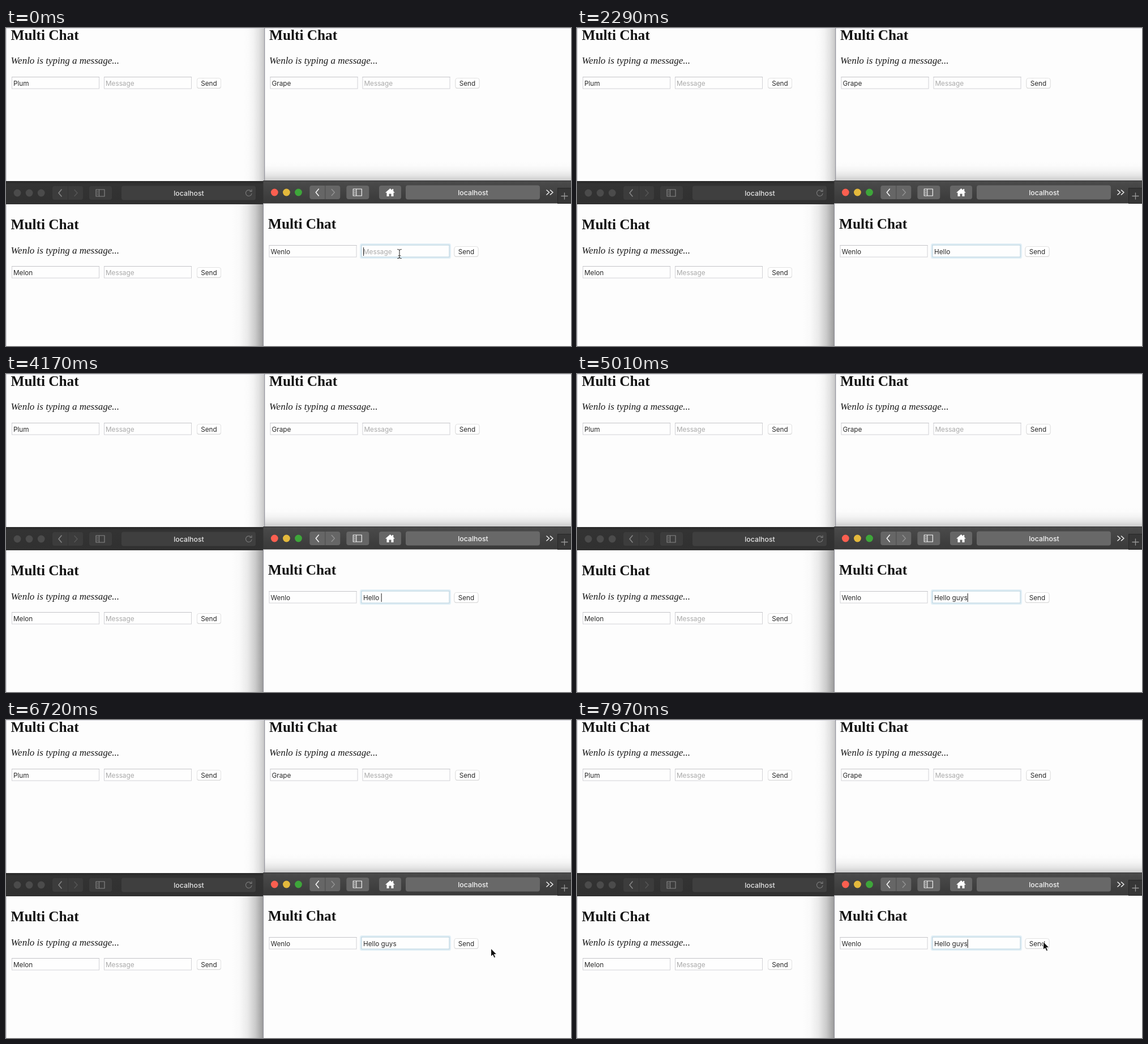
Animation of 998 by 561 pixels, one loop 8000 ms. Source, as an HTML page:

```html
<!DOCTYPE html>
<html lang="en">
<head>
<meta charset="utf-8">
<title>Multi Chat</title>
<style>
  html, body { margin: 0; width: 100%; height: 100%; overflow: hidden; background: #fdfdfd; }
  svg { display: block; width: 100vw; height: 100vh; }
  text { white-space: pre; fill: #2a2a2a; }
  .title { font: bold 25.3px "Liberation Serif", serif; fill: #111; }
  .typing { font: italic 17px "Liberation Serif", serif; fill: #1a1a1a; }
  .field { font: 11.75px Inter, sans-serif; }
  .hint { fill: #a9a9a9; }
  .address { font: 500 12.3px Inter, sans-serif; text-anchor: middle; }
  .button { text-anchor: middle; }
  .icon { fill: none; stroke-width: 1.6; stroke-linecap: round; stroke-linejoin: round; }
</style>
</head>
<body>
<svg id="stage" viewBox="0 0 998 561" preserveAspectRatio="none"></svg>
<script>
const LOOP = 8000, BLINK = 500;
const USER = 'Wenlo';

// Each step: time, contents of the message field
const typed = [
  [0, ''], [950, 'H'], [1220, 'He'], [1390, 'Hel'], [1540, 'Hell'], [1700, 'Hello'],
  [3950, 'Hello '], [4300, 'Hello g'], [4500, 'Hello gu'], [4700, 'Hello guy'], [4900, 'Hello guys']
];
// Pointer path: time, x, y
const path = [[6000, 695, 398], [6500, 845, 405], [6720, 856.5, 403], [7000, 852, 402], [7500, 823.5, 391]];

const box = (x, y, w, h, fill, extra = '') =>
  `<rect x="${x}" y="${y}" width="${w}" height="${h}" fill="${fill}" ${extra}/>`;
const label = (x, y, cls, text, extra = '') =>
  `<text x="${x}" y="${y}" class="${cls}" ${extra}>${text}</text>`;
const icon = (d, color, extra = '') => `<path class="icon" d="${d}" stroke="${color}" ${extra}/>`;

function input(x, y, text, cls = '') {
  return box(x + .5, y + .5, 154, 20.5, '#fefefe', 'stroke="#d2d2d6"')
    + `<path d="M${x} ${y + .5}h155" stroke="#c4c4c8"/>`
    + label(x + 3, y + 15.6, 'field ' + cls, text);
}

function page(dx, titleY, formY, name, active) {
  const message = active
    ? box(dx + 172, formY - 1.5, 158, 24, 'none', 'rx="2" stroke="#e2eff6" stroke-width="3"')
      + box(dx + 173.5, formY, 155, 21, '#fefefe', 'stroke="#b4cfdd"')
      + label(dx + 176.5, formY + 15.6, 'field', '', 'id="message"')
    : input(dx + 173, formY, 'Message', 'hint');
  return label(dx + 8.5, titleY, 'title', 'Multi Chat')
    + (active ? '' : label(dx + 8.5, titleY + 42.3, 'typing', USER + ' is typing a message...'))
    + input(dx + 10, formY, name) + message
    + box(dx + 337, formY + 3, 43, 18, '#d8d8d8', 'rx="4"')
    + box(dx + 337.5, formY + 2.5, 42, 17.5, '#fff', 'rx="3.5" stroke="#e2e2e2"')
    + label(dx + 358.5, formY + 15.6, 'field button', 'Send');
}

const light = (x, y, color) => `<circle cx="${x}" cy="${y}" r="6.4" fill="${color}"/>`;
const sidebar = (x, y, color) =>
  icon(`M${x - 7.5} ${y - 6}h15v12h-15zM${x - 2} ${y - 6}v12M${x - 5.5} ${y - 3}h1.5m-1.5 3h1.5m-1.5 3h1.5`, color, 'style="stroke-width:1.2"');

function toolbar(x, y, o) {
  const button = (bx, w) => box(x + bx, y - 12, w, 24, o.button, 'rx="4"');
  return o.lights.map((c, i) => light(x + 20 + i * 21.1, y, c)).join('')
    + button(82, 54)
    + icon(`M${x + 109.5} ${y - 12}v24`, o.split, 'style="stroke-width:1"')
    + icon(`M${x + 98} ${y - 6}l-5 6 5 6`, o.back)
    + icon(`M${x + 121} ${y - 5.5}l5 5.5-5 5.5`, o.forward)
    + button(147, 40) + sidebar(x + 166.5, y, o.back);
}

const url = (x, y, fill, color) => box(x, y - 12.5, 237, 25, fill, 'rx="4"')
  + label(x + 119, y + 5, 'address', 'localhost', `style="fill:${color}"`);

const gradient = (id, dir, stops) => `<linearGradient id="${id}" ${dir}>`
  + stops.map(([at, color, alpha = 1]) => `<stop offset="${at}" stop-color="${color}" stop-opacity="${alpha}"/>`).join('')
  + '</linearGradient>';
const down = 'x1="0" y1="0" x2="0" y2="1"';
const shadow = (id, dir, strength) =>
  gradient(id, dir, [0, .25, .5, .75, 1].map(at => [at, '#333', strength * at ** 2.4]));

stage.innerHTML = `<defs>
  ${shadow('side', '', .5)}
  ${shadow('sideSoft', '', .26)}
  ${shadow('under', down, .24)}
  ${gradient('dim', down, [[0, '#292929'], [.15, '#333'], [1, '#303030']])}
  ${gradient('bright', down, [[0, '#4b4b4b'], [1, '#393939']])}
  </defs>`
  + box(0, 0, 998, 561, '#fdfdfd')
  + box(418, 0, 38, 270, 'url(#sideSoft)')
  + box(457, 234, 541, 35, 'url(#under)')
  + box(398, 310, 57, 251, 'url(#side)')
  + box(0, 0, 998, 1, '#d6d6de') + box(0, 0, 1, 561, '#c9c9d2')
  + box(456, 0, 1.3, 269, '#96969e')
  + page(0, 20.8, 86, 'Plum') + page(456.5, 20.8, 86, 'Grape')
  + page(0, 355.3, 420, 'Melon') + page(454.5, 354.3, 383, USER, true)
  // Inactive window
  + box(0, 270, 455, 41, 'url(#dim)')
  + toolbar(0, 291, { lights: ['#4b4b4b', '#4b4b4b', '#4b4b4b'], button: '#3c3c3c', split: '#333', back: '#858585', forward: '#555' })
  + url(204, 291, '#3f3f3f', '#e4e4e4')
  + icon('M433 288a5.3 5.3 0 1 0 1 4M434 285v3.5h-3.5', '#777', 'style="stroke-width:1.2"')
  // Active window
  + box(454.5, 269, 543.5, 40.5, 'url(#bright)') + box(454.5, 269, 543.5, 1, '#38383a')
  + box(454, 309, 1, 252, '#8d8d96')
  + toolbar(454.3, 290, { lights: ['#fb5f50', '#e4b93c', '#3ea63a'], button: '#666', split: '#4b4b4b', back: '#f4f4f4', forward: '#919191' })
  + box(659, 278, 39, 24, '#666', 'rx="4"')
  + '<path d="M670 290.5l8.5-7.5 3.5 3v-2h2.2v4l2.8 2.5h-2.5v6.5h-4v-4.5h-4v4.5h-4v-6.5z" fill="#fff"/>'
  + url(706, 290, '#686868', '#f5f5f5')
  + icon('M955 286l4.5 4-4.5 4M961.5 286l4.5 4-4.5 4', '#eee')
  + box(974.5, 282.5, 24, 27, '#363636', 'stroke="#282828"')
  + icon('M981 296.5h11M986.5 291v11', '#999', 'style="stroke-width:1.3"')
  + box(0, 387, 1.1, 15, '#333', 'id="caret"')
  + `<g id="beam">${icon('M-3.5 -7.5q3.5 0 3.5 2.5v11q0 2.5-3.5 2.5M3.5 -7.5q-3.5 0-3.5 2.5M3.5 8.5q-3.5 0-3.5-2.5M-2 3.5h4', '#444', 'style="stroke-width:1.2"')}</g>`
  + '<path id="arrow" d="M0 0v14.4l3.3-3 2.3 5.2 2.6-1.1-2.3-5h4.5z" fill="#111" stroke="#fff" stroke-width="1"/>';

const el = id => document.getElementById(id);
const message = el('message'), caret = el('caret'), beam = el('beam'), arrow = el('arrow');
const show = (node, on) => node.setAttribute('visibility', on ? 'visible' : 'hidden');

function pointerAt(t) {
  if (t <= path[0][0]) return path[0].slice(1);
  const next = path.findIndex(p => p[0] > t);
  if (next < 0) return path[path.length - 1].slice(1);
  const [t0, x0, y0] = path[next - 1], [t1, x1, y1] = path[next];
  const k = (t - t0) / (t1 - t0), ease = k * k * (3 - 2 * k);
  return [x0 + (x1 - x0) * ease, y0 + (y1 - y0) * ease];
}

function draw(t) {
  const [since, text] = typed.filter(step => step[0] <= t).pop();
  const content = text || 'Message';
  if (message.textContent !== content) message.textContent = content;
  message.classList.toggle('hint', !text);

  caret.setAttribute('x', 631 + (text ? message.getComputedTextLength() : 0));
  show(caret, Math.floor((t - since) / BLINK) % 2 === 0);

  // The pointer hides while typing and becomes an arrow outside the field
  const [x, y] = pointerAt(t);
  const visible = t < typed[1][0] || t >= path[0][0];
  const inField = x < 784;
  for (const node of [beam, arrow]) node.setAttribute('transform', `translate(${x} ${y})`);
  show(beam, visible && inField);
  show(arrow, visible && !inField);
}

const start = performance.now();
function tick() {
  draw((performance.now() - start) % LOOP);
  requestAnimationFrame(tick);
}
tick();
</script>
</body>
</html>
```
